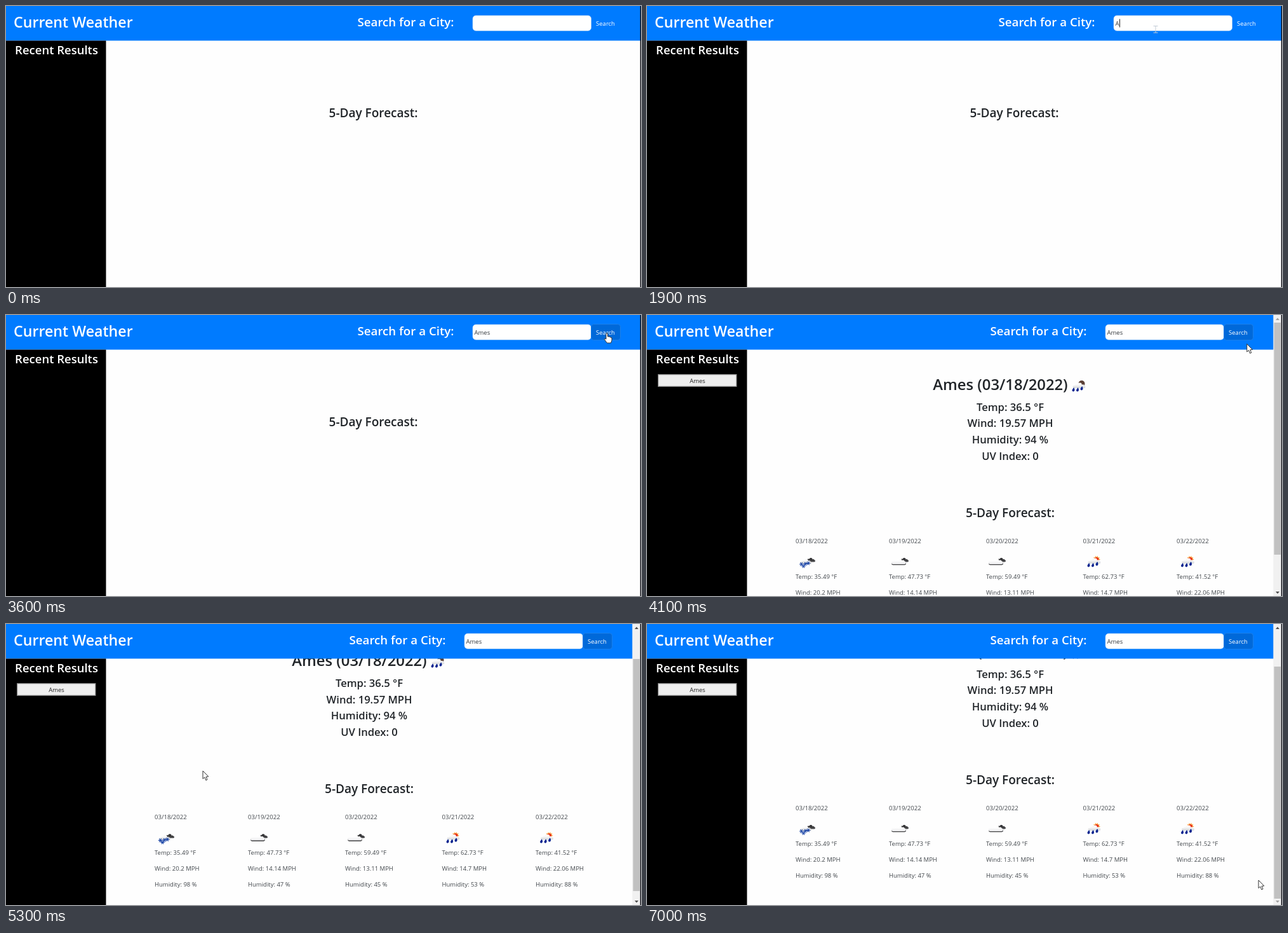
An HTML page with a canvas that plays this animation: 1000x442 px, repeating every 7.1 s.

```html
<!DOCTYPE html>
<html lang="en">
<head>
<meta charset="utf-8">
<title>Current Weather</title>
<style>
  html, body { margin: 0; width: 100%; height: 100%; overflow: hidden; background: #fff; }
  canvas { display: block; }
</style>
</head>
<body>
<canvas id="stage" width="1000" height="442"></canvas>
<script>
const ctx = document.getElementById('stage').getContext('2d');
const LOOP = 7100, STEP = 100;
const LOADED = 3900, HOVER = 3200, FOCUS = 1000;
const BLUE = '#007bff', INK = '#212529', SOFT = '#41464b';
const FONT = '"Open Sans", "Noto Sans", sans-serif';

// time, x, y of the pointer tip
const PATH = [
  [100, 971, 374], [400, 905, 190], [800, 801, 37], [2800, 801, 37],
  [3400, 946, 28], [4000, 946, 28], [4400, 938, 140], [4800, 929, 192],
  [5300, 310, 231], [5800, 765, 6], [5900, 800, 20],
  [6700, 964, 399], [7000, 963, 403]
];
const TYPED = [[1900, 'A'], [2100, 'Am'], [2200, 'Ame'], [2400, 'Ames']];
const DAYS = [
  [234, '03/18/2022', 'snow', '35.49', '20.2', 98],
  [381, '03/19/2022', 'cloud', '47.73', '14.14', 47],
  [534, '03/20/2022', 'cloud', '59.49', '13.11', 45],
  [686.5, '03/21/2022', 'rain', '62.73', '14.7', 53],
  [834, '03/22/2022', 'rain', '41.52', '22.06', 88]
];

function text(str, x, y, size, color = INK, align = 'left', weight = 400) {
  ctx.font = `${weight} ${size}px ${FONT}`;
  ctx.fillStyle = color;
  ctx.textAlign = align;
  ctx.fillText(str, x, y);
}
const heading = (str, x, y, size, color, align = 'center') =>
  text(str, x, y, size, color, align, 600);

function rect(x, y, w, h, color) {
  ctx.fillStyle = color;
  ctx.fillRect(x, y, w, h);
}

function round(x, y, w, h, r, fill, stroke, line = 1) {
  ctx.beginPath();
  ctx.roundRect(x, y, w, h, r);
  if (fill) { ctx.fillStyle = fill; ctx.fill(); }
  if (stroke) { ctx.strokeStyle = stroke; ctx.lineWidth = line; ctx.stroke(); }
}

function poly(points, fill, stroke) {
  ctx.beginPath();
  points.forEach(([x, y]) => ctx.lineTo(x, y));
  ctx.closePath();
  ctx.fillStyle = fill;
  ctx.fill();
  if (stroke) { ctx.strokeStyle = stroke; ctx.lineWidth = 1; ctx.stroke(); }
}

function dot(x, y, r, color) {
  ctx.beginPath();
  ctx.arc(x, y, r, 0, Math.PI * 2);
  ctx.fillStyle = color;
  ctx.fill();
}

function cloud(x, y, w, top, bottom) {
  const h = w * 0.42, g = ctx.createLinearGradient(0, y - h, 0, y);
  g.addColorStop(0.35, top);
  g.addColorStop(1, bottom);
  ctx.beginPath();
  ctx.roundRect(x, y - h * 0.5, w, h * 0.5, h * 0.25);
  for (const [px, py, r] of [[0.3, 0.45, 0.3], [0.55, 0.6, 0.4], [0.8, 0.4, 0.28]]) {
    ctx.moveTo(x + w * px + h * r, y - h * py);
    ctx.arc(x + w * px, y - h * py, h * r, 0, Math.PI * 2);
  }
  ctx.fillStyle = g;
  ctx.fill();
}

function drop(x, y) {
  ctx.beginPath();
  ctx.moveTo(x + 1.2, y - 4);
  ctx.quadraticCurveTo(x + 4.2, y + 1, x + 0.6, y + 2.4);
  ctx.quadraticCurveTo(x - 4, y + 2, x + 1.2, y - 4);
  ctx.fillStyle = '#0a2590';
  ctx.fill();
}

function flake(x, y) {
  ctx.strokeStyle = '#1f48a8';
  ctx.lineWidth = 1.1;
  ctx.beginPath();
  for (let a = 0; a < 3; a++) {
    const dx = Math.cos(a * Math.PI / 3) * 3.2, dy = Math.sin(a * Math.PI / 3) * 3.2;
    ctx.moveTo(x - dx, y - dy);
    ctx.lineTo(x + dx, y + dy);
  }
  ctx.stroke();
}

function sun() {
  const rays = [];
  for (let i = 0; i < 20; i++) {
    const r = i % 2 ? 3.8 : 6, a = i * Math.PI / 10;
    rays.push([4.5 + Math.cos(a) * r, -3.5 + Math.sin(a) * r]);
  }
  poly(rays, '#f9a13a');
  dot(4.5, -3.5, 3.3, '#e8301c');
}

function icon(kind, x, y) {
  ctx.save();
  ctx.translate(x, y);
  if (kind === 'snow' || kind === 'cloud') cloud(-1.5, 0.5, 15.5, '#343436', '#505052');
  if (kind === 'snow') {
    cloud(-10, 3.5, 18, '#f8f8f8', '#c4c6ca');
    flake(-8, 4); flake(-1.5, 3.5); flake(-4.5, 7); flake(3, 2.5);
  } else if (kind === 'cloud') {
    cloud(-13, 5.3, 23, '#dcdcde', '#2d2d2f');
    cloud(-13, 4, 22.5, '#ffffff', '#ececee');
  } else {
    if (kind === 'rain') sun(); else dot(5, -4, 5, '#5b4036');
    cloud(-9, 3, 20, '#fafafa', '#d5d7da');
    drop(-8.5, 6); drop(-2, 6); drop(4.5, 4);
  }
  ctx.restore();
}

function results(scroll) {
  ctx.save();
  ctx.translate(0, -scroll);
  heading('Ames (03/18/2022)', 556.5, 118, 23.8);
  icon('night', 679.5, 112);
  ['Temp: 36.5 °F', 'Wind: 19.57 MPH', 'Humidity: 94 %', 'UV Index: 0']
    .forEach((s, i) => heading(s, 572, 150.5 + i * 25.8, 16.6));
  heading('5-Day Forecast:', 572, 318, 19);
  for (const [x, date, kind, temp, wind, hum] of DAYS) {
    icon(kind, x + 17, 388);
    text(date, x, 359, 9.55, SOFT);
    text(`Temp: ${temp} °F`, x, 415, 9.5, SOFT);
    text(`Wind: ${wind} MPH`, x, 440, 9.5, SOFT);
    text(`Humidity: ${hum} %`, x, 465, 9.5, SOFT);
  }
  ctx.restore();
}

function scrollbar(scroll) {
  rect(986.3, 0, 12.7, 442, '#f1f1f1');
  rect(987.5, 12 + scroll * 55 / 66, 10.5, 365, '#c1c1c1');
  poly([[990, 8], [993, 4.5], [996, 8]], scroll ? '#505050' : '#a3a3a3');
  poly([[990, 435], [993, 438.5], [996, 435]], scroll < 66 ? '#505050' : '#a3a3a3');
}

function header(t, shift) {
  rect(0, 0, 999, 54.5, BLUE);
  heading('Current Weather', 12, 34, 23.2, '#fff', 'left');
  heading('Search for a City:', 629.5 - shift, 32, 18.7, '#fff');

  const x = 735 - shift;
  round(x, 15, 186.5, 24, 5, '#fff', 'rgba(190,215,240,.6)');
  const value = TYPED.reduce((v, [at, s]) => t >= at ? s : v, '');
  text(value, x + 2.5, 31, 9.5, '#33383d');
  const caret = t >= FOCUS && t < 2800 && !(t >= 1400 && t < 1500);
  if (caret) rect(Math.round(x + 2.5 + ctx.measureText(value).width), 20.5, 1, 13, '#222');

  if (t >= HOVER) {
    round(x + 186.5, 14.5, 46, 25, 4, '#0069d9', '#1c80ea');
  }
  text('Search', x + 209, 31, 9.5, '#fff', 'center');
}

function sidebar(loaded) {
  rect(0, 54.5, 157.5, 387.5, '#000');
  heading('Recent Results', 79.5, 76, 18.5, '#fff');
  if (!loaded) return;
  rect(17, 93, 124.5, 20, '#8a8a8a');
  rect(18.3, 94.3, 122, 17.4, '#efefef');
  text('Ames', 79.5, 107, 9.5, '#222', 'center');
}

function pointer(t) {
  if (t < PATH[0][0]) return;
  const i = Math.min(PATH.filter(k => k[0] <= t).length, PATH.length - 1);
  const [t0, x0, y0] = PATH[i - 1], [t1, x1, y1] = PATH[i];
  const u = (t - t0) / (t1 - t0), e = u * u * (3 - 2 * u);
  const x = x0 + (x1 - x0) * e, y = y0 + (y1 - y0) * e;
  ctx.save();
  ctx.translate(x, y);
  if (t >= 800 && t < HOVER) {
    ctx.strokeStyle = '#c3ccd6';
    ctx.lineWidth = 1;
    ctx.beginPath();
    for (const s of [-5.5, 5]) { ctx.moveTo(-3.5, s); ctx.lineTo(3.5, s); }
    ctx.moveTo(0, -5.5);
    ctx.lineTo(0, 5);
    ctx.stroke();
  } else if (t >= HOVER && t <= 4000) {
    poly([[-1, 1], [0, 0], [1.5, 1], [1.7, 6], [4, 6], [6, 7], [8, 8], [8, 12],
      [6.5, 16], [0.5, 16], [-3.5, 10.5], [-3, 9], [-1, 10]], '#fff', '#333');
  } else {
    poly([[0, 0], [0, 12.5], [2.8, 10], [4.8, 14.8], [7, 13.8], [5, 9.3], [8.8, 9]],
      '#fff', '#333');
  }
  ctx.restore();
}

function draw(t) {
  const loaded = t >= LOADED;
  const u = Math.min(1, Math.max(0, (t - 5100) / 400));
  const scroll = 66 * (1 - Math.pow(1 - u, 2.2));
  rect(0, 0, 1000, 442, '#fefefe');
  if (loaded) results(scroll);
  else heading('5-Day Forecast:', 578.5, 175, 19);
  header(t, loaded ? 13 : 0);
  sidebar(loaded);
  if (loaded) scrollbar(scroll);
  rect(998.7, 0, 1.3, 442, '#0a0a12');
  pointer(t);
}

const start = performance.now();
function frame() {
  const t = (performance.now() - start) % LOOP;
  draw(Math.floor(t / STEP) * STEP);
  requestAnimationFrame(frame);
}
frame();
</script>
</body>
</html>
```
